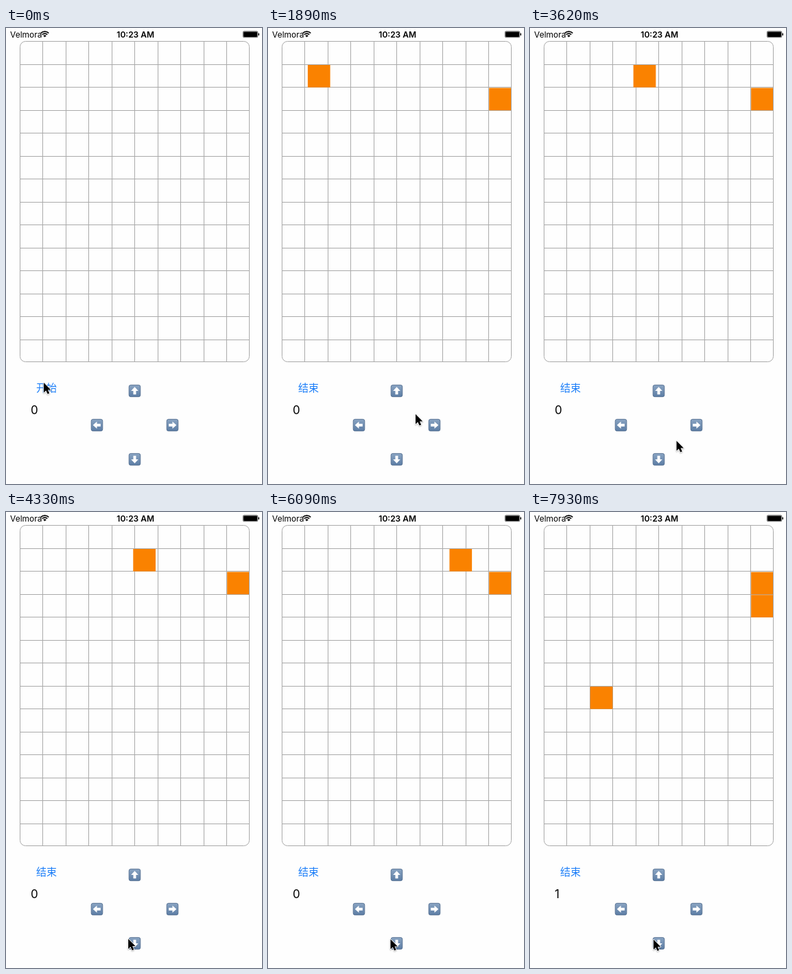
Write an HTML page with a canvas that moves like this. It is 373 px wide and 666 px high and loops after 7.99 s.

```html
<!DOCTYPE html>
<html lang="zh">
<head>
<meta charset="utf-8">
<title>Snake</title>
<style>
  html, body { margin: 0; width: 100%; height: 100%; overflow: hidden; background: #fefefe; }
  canvas { display: block; width: 373px; height: 666px; }
</style>
</head>
<body>
<canvas></canvas>
<script>
const W = 373, H = 666, LOOP = 7990;
const CELL = 33.5, COLS = 10, ROWS = 14;
const START = 1047, TICK = 685, TURN = 9;
const ORANGE = '#fa8200', GREY = '#aaaaaa', BLUE = '#1a7df8';
const SANS = 'Inter, Roboto, sans-serif';
const CJK = '"Noto Sans CJK SC", "Noto Sans CJK", "Noto Sans CJK JP", sans-serif';

const canvas = document.querySelector('canvas');
const dpr = window.devicePixelRatio || 1;
canvas.width = W * dpr;
canvas.height = H * dpr;
const ctx = canvas.getContext('2d');

const clamp = v => Math.max(0, Math.min(1, v));
const ramp = (t, a, b) => clamp((t - a) / (b - a));
const smooth = p => p * p * (3 - 2 * p);

// Cubic bezier (0.42, 0, 0.58, 1), solved by bisection
function ease(p) {
  let lo = 0, hi = 1, s = p;
  for (let i = 0; i < 18; i++) {
    s = (lo + hi) / 2;
    const x = 1.26 * s * (1 - s) ** 2 + 1.74 * s * s * (1 - s) + s ** 3;
    if (x < p) lo = s; else hi = s;
  }
  return smooth(s);
}

// time, x, y of the pointer tip
const pointerPath = [
  [1200, 55, 518], [1800, 215, 564], [2050, 215, 564], [2500, 235, 572.5],
  [2900, 237, 575], [3470, 237, 575], [3620, 213.5, 603], [3950, 177, 622],
  [4500, 178.5, 624], [7100, 178.5, 624], [7500, 180, 624.5]
];

function pointerAt(t) {
  const k = pointerPath.findIndex(p => p[0] > t);
  if (k === 0) return pointerPath[0].slice(1);
  if (k < 0) return pointerPath[pointerPath.length - 1].slice(1);
  const [ta, xa, ya] = pointerPath[k - 1], [tb, xb, yb] = pointerPath[k];
  const p = smooth(ramp(t, ta, tb));
  return [xa + (xb - xa) * p, ya + (yb - ya) * p];
}

function text(str, x, y, font, color = '#000', align = 'left') {
  ctx.font = font;
  ctx.fillStyle = color;
  ctx.textAlign = align;
  ctx.fillText(str, x, y);
}

function poly(points) {
  ctx.beginPath();
  points.forEach(([x, y]) => ctx.lineTo(x, y));
  ctx.closePath();
}

function rounded(x, y, w, h, r) {
  ctx.beginPath();
  ctx.roundRect(x, y, w, h, r);
}

function faded(alpha, draw) {
  if (alpha <= 0) return;
  ctx.save();
  ctx.globalAlpha = alpha;
  draw();
  ctx.restore();
}

function statusBar() {
  text('Velmora', 6, 13.5, `12px ${SANS}`);
  text('10:23 AM', 188.7, 13.5, `600 12px ${SANS}`, '#000', 'center');
  ctx.strokeStyle = '#000';
  ctx.lineWidth = 1.7;
  for (const r of [5.2, 8.2]) {
    ctx.beginPath();
    ctx.arc(56.5, 13.3, r, -Math.PI * 0.75, -Math.PI * 0.25);
    ctx.stroke();
  }
  ctx.fillStyle = '#000';
  ctx.beginPath();
  ctx.moveTo(56.5, 13.6);
  ctx.arc(56.5, 13.6, 3.2, -Math.PI * 0.75, -Math.PI * 0.25);
  ctx.fill();
  ctx.lineWidth = 0.6;
  rounded(345.3, 4.8, 21.6, 8.9, 1.6);
  ctx.stroke();
  rounded(346.1, 5.6, 20, 7.3, 0.8);
  ctx.fill();
  rounded(367.6, 7.6, 1.4, 3.4, 0.7);
  ctx.fill();
}

function grid() {
  ctx.fillStyle = GREY;
  for (let i = 1; i < COLS; i++) ctx.fillRect(Math.floor(20 + CELL * i), 19, 1, 469);
  for (let i = 1; i < ROWS; i++) ctx.fillRect(20, Math.floor(19.5 + CELL * i), 335, 1);
}

function border() {
  ctx.strokeStyle = GREY;
  ctx.lineWidth = 1;
  rounded(20.5, 19.5, 334, 468, 8);
  ctx.stroke();
}

function block(col, row) {
  ctx.fillStyle = ORANGE;
  ctx.fillRect(20.7 + CELL * col, 20.5 + CELL * row, 32.7, 32.7);
}

function game(t) {
  if (t < START) return;
  const u = (t - START) / TICK;
  const step = Math.floor(u);
  const pos = step + ease(u - step);
  if (u < TURN) {
    block(pos, 1);
    block(9, 2);
  } else {
    block(9, 1 + pos - TURN);
    block(9, 2 + pos - TURN);
    if (u >= TURN + 1) block(2, 7);
  }
}

function arrowKey(x, y, turns, alpha = 1) {
  faded(alpha, () => {
    ctx.translate(x, y);
    const fill = ctx.createLinearGradient(0, -9, 0, 9);
    fill.addColorStop(0, '#8ba5c3');
    fill.addColorStop(1, '#5b7ca4');
    rounded(-8.3, -8.6, 16.6, 17.2, 2.6);
    ctx.fillStyle = fill;
    ctx.fill();
    ctx.strokeStyle = '#536f90';
    ctx.lineWidth = 0.9;
    ctx.stroke();
    ctx.rotate(turns * Math.PI / 2);
    poly([[0, -5.8], [5.3, 0], [2, 0], [2, 5.3], [-2, 5.3], [-2, 0], [-5.3, 0]]);
    ctx.fillStyle = '#fff';
    ctx.fill();
  });
}

function controls(t) {
  const swap = ramp(t, START + 10, START + 180);
  const label = `15px ${CJK}`;
  faded(1 - swap, () => text('开始', 44, 530.7, label, BLUE));
  faded(swap, () => text('结束', 44, 530.7, label, BLUE));
  text(t < START + TURN * TICK ? '0' : '1', 36, 564.3, `17px ${SANS}`);

  const pressed = ramp(t, 6755, 6775) - ramp(t, 7000, 7180);
  arrowKey(187.5, 530, 0);
  arrowKey(242.5, 580, 1);
  arrowKey(187.5, 630, 2, 1 - 0.8 * pressed);
  arrowKey(132.5, 580, 3);
}

function pointer(t) {
  const [x, y] = pointerAt(t);
  ctx.save();
  ctx.translate(x, y);
  poly([[0, 0], [0, 14.6], [3.3, 11.5], [5.6, 16.6], [8.2, 15.5], [6, 10.5], [10.4, 10.4]]);
  ctx.shadowColor = 'rgba(0,0,0,.3)';
  ctx.shadowBlur = 2 * dpr;
  ctx.shadowOffsetY = dpr;
  ctx.lineJoin = 'round';
  ctx.lineWidth = 1.6;
  ctx.strokeStyle = '#fff';
  ctx.stroke();
  ctx.shadowColor = 'transparent';
  ctx.fillStyle = '#000';
  ctx.fill();
  ctx.restore();
}

function draw(t) {
  ctx.setTransform(dpr, 0, 0, dpr, 0, 0);
  ctx.fillStyle = '#fefefe';
  ctx.fillRect(0, 0, W, H);
  statusBar();
  grid();
  game(t);
  border();
  controls(t);
  pointer(t);
}

const begin = performance.now();
function frame() {
  draw((performance.now() - begin) % LOOP);
  requestAnimationFrame(frame);
}
frame();
</script>
</body>
</html>
```
